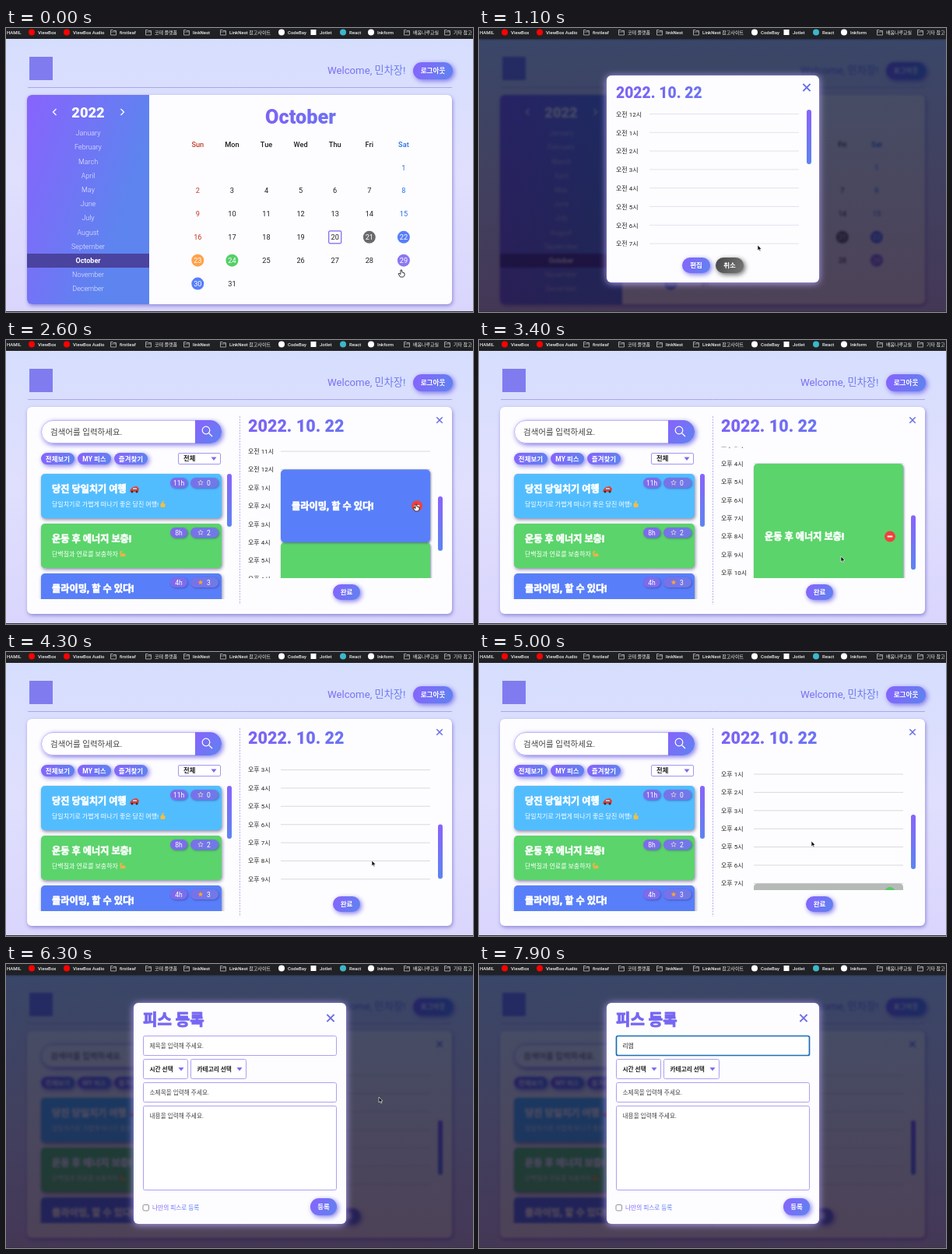
An HTML page with a canvas that plays this animation: 600 by 365 pixels, repeating every 8 s.

```html
<!DOCTYPE html>
<html lang="ko">
<head>
<meta charset="utf-8">
<title>Planner</title>
<style>
html, body { margin: 0; width: 100%; height: 100%; overflow: hidden; }
canvas { display: block; width: 600px; height: 365px; }
</style>
</head>
<body>
<canvas></canvas>
<script>
const LOOP = 8000, HOUR = 23.4;
const canvas = document.querySelector('canvas'), c = canvas.getContext('2d');
const dpr = devicePixelRatio || 1;
canvas.width = 600 * dpr;
canvas.height = 365 * dpr;

const FONT = "Roboto, 'Noto Sans CJK KR', 'Noto Sans CJK', sans-serif";
const BLUE = '#587ff9', GREEN = '#5bd46b', INK = '#222', PURPLE = '#7667f2';
const MONTHS = 'January February March April May June July August September October November December'.split(' ');
const DAYS = 'Sun Mon Tue Wed Thu Fri Sat'.split(' ');
const MARKED = { 21: '#6a6a6c', 22: BLUE, 23: '#ffa24a', 24: '#55cf68', 29: '#8b78f2', 30: BLUE };

const BOOKMARKS = [
  [33, 'dot', '#f00', 'ViewBox'], [78, 'dot', '#f00', 'ViewBox Audio'], [138, 'folder', '', 'firstleaf'],
  [183, 'folder', '', '코테 플랫폼'], [232, 'folder', '', 'linkNest'], [279, 'folder', '', 'LinkNest 참고사이트'],
  [354, 'dot', '#fff', 'CodeBay'], [395, 'square', '#fff', 'Jotlet'], [433, 'dot', '#3bb8c9', 'React'],
  [469, 'dot', '#fff', 'Inkform'], [515, 'folder', '', '배움나루교실'], [567, 'folder', '', '기타 참고']
];

// Keyframes: time, value(s)
const SCROLL = [[1850, 424], [2400, 166.5], [2800, 166.5], [3300, 65.4], [4050, 65.4], [4850, 133.6], [5150, 133.6], [5550, 166.5]];
const POINTER = [[0, 508, 311], [300, 508, 311], [500, 511, 268], [700, 510, 268], [1100, 358, 279], [1400, 279, 303],
  [1700, 279, 303], [2050, 440, 230], [2500, 527, 211], [2800, 527, 211], [3300, 465, 278], [3450, 465, 278],
  [3700, 528, 251], [3900, 528, 251], [4300, 470, 268], [5000, 427, 243], [5600, 527, 202], [5950, 527, 202],
  [6250, 479, 171], [6350, 479, 171], [6800, 300, 103]];
const TYPED = [[7400, 'ㄹ'], [7500, '리'], [7600, '링'], [7700, '리애'], [7800, '리앰']];

const ramp = (t, a, b) => Math.min(1, Math.max(0, (t - a) / (b - a)));
const between = (t, a, b) => t >= a && t < b;

function track(keys, t, column = 1) {
  let i = keys.findIndex(k => k[0] > t);
  if (i < 0) return keys[keys.length - 1][column];
  if (i === 0) return keys[0][column];
  const a = keys[i - 1], b = keys[i], u = ramp(t, a[0], b[0]);
  return a[column] + (b[column] - a[column]) * u * u * (3 - 2 * u);
}

function gradient(x, y, w, h, from = '#8863fd', to = '#5d84ef') {
  const g = c.createLinearGradient(x, y, x + w, y + h);
  g.addColorStop(0, from);
  g.addColorStop(1, to);
  return g;
}

function shadow(color, blur, dx = 0, dy = 0) {
  c.shadowColor = color;
  c.shadowBlur = blur * dpr;
  c.shadowOffsetX = dx * dpr;
  c.shadowOffsetY = dy * dpr;
}

function box(x, y, w, h, r, fill, stroke, lineWidth = 1) {
  c.beginPath();
  c.roundRect(x, y, w, h, r);
  if (fill) { c.fillStyle = fill; c.fill(); }
  if (stroke) { c.strokeStyle = stroke; c.lineWidth = lineWidth; c.stroke(); }
}

function shaded(x, y, w, h, r, fill, color = 'rgba(100,85,230,.8)', blur = 6, dx = 2, dy = 2) {
  c.save();
  shadow(color, blur, dx, dy);
  box(x, y, w, h, r, fill);
  c.restore();
}

function disc(x, y, r, fill) {
  c.beginPath();
  c.arc(x, y, r, 0, 7);
  c.fillStyle = fill;
  c.fill();
}

function line(points, color, width = 1) {
  c.beginPath();
  points.forEach(([x, y]) => c.lineTo(x, y));
  c.strokeStyle = color;
  c.lineWidth = width;
  c.stroke();
}

function poly(points, fill) {
  c.beginPath();
  points.forEach(([x, y]) => c.lineTo(x, y));
  c.closePath();
  c.fillStyle = fill;
  c.fill();
}

// Weight 900 gets an outline, since the Korean face stops at bold.
function text(s, x, y, size, fill = INK, weight = 400, align = 'left') {
  c.font = `${weight} ${size}px ${FONT}`;
  c.textAlign = align;
  c.fillStyle = fill;
  c.fillText(s, x, y + size * .36);
  if (weight === 900) {
    c.lineJoin = 'round';
    c.strokeStyle = fill;
    c.lineWidth = size * .05;
    c.strokeText(s, x, y + size * .36);
  }
}

const label = (s, x, y, size, fill, weight) => text(s, x, y, size, fill, weight, 'center');

function clipped(x, y, w, h, draw) {
  c.save();
  c.beginPath();
  c.rect(x, y, w, h);
  c.clip();
  draw();
  c.restore();
}

function pill(s, x, y, w, h, size = 8.5, fill = gradient(x, y, w, h)) {
  shaded(x, y, w, h, h / 2, fill);
  label(s, x + w / 2, y + h / 2, size, '#fff', 700);
}

function cross(x, y, r, width) {
  line([[x - r, y - r], [x + r, y + r]], '#6b6de6', width);
  line([[x - r, y + r], [x + r, y - r]], '#6b6de6', width);
}

const triangle = (x, y) => poly([[x - 3.5, y - 2], [x + 3.5, y - 2], [x, y + 2.5]], '#7a6cf0');
const scrollbar = (x, y, h) => box(x, y, 6, h, 3, gradient(x, y, 0, h));
const hourName = h => `${h > 12 ? '오후' : '오전'} ${h % 12 || 12}시`;

function bookmarks() {
  box(0, 0, 600, 14, 0, '#202124');
  text('HAMIL', 1, 5.5, 6, '#eee', 500);
  for (const [x, kind, color, name] of BOOKMARKS) {
    if (kind === 'dot') disc(x, 5.5, 4, color);
    else if (kind === 'square') box(x - 3.5, 2, 7, 7, 0, color);
    else {
      line([[x - 3.5, 9], [x - 3.5, 2.5], [x - 1, 2.5], [x, 3.5], [x + 3.5, 3.5], [x + 3.5, 9], [x - 3.5, 9]], '#bbb', .8);
      line([[x - 3.5, 5], [x + 3.5, 5]], '#bbb', .7);
    }
    text(name, x + 8, 5.5, 6, '#eee', 500);
  }
}

function header() {
  const bg = gradient(0, 14, 0, 351, '#d6defe', '#d9d5fd');
  bg.addColorStop(.5, '#e0dffd');
  box(0, 14, 600, 351, 0, bg);
  box(30, 37, 30, 30, 0, '#807cf0');
  text('Welcome, 민차장!', 413, 54.5, 13.2, gradient(413, 0, 100, 0, '#7d6cf0', '#6a80ee'));
  pill('로그아웃', 523, 44, 51, 22, 8.6);
  line([[28, 76.5], [573, 76.5]], '#aaa6ec');
}

const panel = h => shaded(27, 86, 546, h, 6, '#fdfdff', 'rgba(90,80,190,.6)', 5, 1, 2);

function calendar() {
  panel(269);
  box(27, 86, 157, 269, [6, 0, 0, 6], gradient(27, 86, 157, 50));
  label('2022', 105.5, 108, 18.3, '#fff', 800);
  line([[64.5, 104], [60.5, 108], [64.5, 112]], '#fff', 1.3);
  line([[147.5, 104], [151.5, 108], [147.5, 112]], '#fff', 1.3);
  box(27, 290, 157, 18, 0, '#4a439f');
  MONTHS.forEach((m, i) => label(m, 105.5, 135 + i * 18.18, 9, i === 9 ? '#fff' : '#efedff', i === 9 ? 700 : 300));

  label('October', 378.5, 114, 25.3, gradient(333, 0, 91, 0, '#7d62f6', '#6b73f2'), 800);
  const column = d => 246.3 + d * 44.1;
  const tint = d => d === 0 ? '#c23a25' : d === 6 ? '#2770e2' : INK;
  DAYS.forEach((d, i) => label(d, column(i), 149.5, 9.2, tint(i), 500));
  for (let day = 1; day <= 31; day++) {
    const cell = day + 5, d = cell % 7, x = column(d), y = 179.3 + Math.floor(cell / 7) * 29.85;
    if (MARKED[day]) disc(x, y, 8, MARKED[day]);
    if (day === 20) box(x - 8, y - 8, 16, 16, 1.5, null, PURPLE, 1.2);
    label(day, x, y, 9.2, MARKED[day] ? '#fff' : tint(d), 400);
  }
}

function star(x, y, filled) {
  const points = Array.from({ length: 11 }, (_, i) => {
    const a = i * Math.PI / 5 - Math.PI / 2, r = i % 2 ? 1.5 : 3.4;
    return [x + r * Math.cos(a), y + r * Math.sin(a)];
  });
  if (filled) poly(points, '#ffa62e');
  else line(points, '#e5ddd0', .7);
}

function car(x, y) {
  poly([[x - 6, y + 3], [x - 5, y], [x - 2, y - 3], [x + 3, y - 4], [x + 6, y - 1], [x + 5, y + 3]], '#e33c36');
  box(x - 2, y - 2, 5, 2, 0, '#9bd0e8');
  disc(x - 3, y + 3, 1.5, '#333');
  disc(x + 3, y + 3, 1.5, '#333');
}

function thumb(x, y) {
  box(x - 2.5, y - 1, 6, 5, 1.5, '#f6bd43');
  line([[x - 1, y + 1], [x + 1, y - 4]], '#f6bd43', 2);
}

function arm(x, y) {
  line([[x - 1, y - 3.5], [x - 3, y - 2], [x - 2, y + 2.5], [x + 3.5, y + 2]], '#f5b145', 2);
  disc(x + 1, y + 1, 2, '#f5b145');
}

function piece(y, fill, title, sub, hours, stars, filled) {
  shaded(45, y, 232, 57, 5, fill, 'rgba(60,60,110,.6)', 4, 1, 2);
  text(title, 59, y + 19.5, 12.2, '#fff', 900);
  text(sub, 59, y + 39, 8, '#fff');
  const tag = gradient(211, y, 62, 14, '#8068ec', '#6f7be6');
  shaded(211, y + 5, 22, 13, 6.5, tag, 'rgba(60,50,160,.6)', 3, 1, 1);
  shaded(237, y + 5, 36, 13, 6.5, tag, 'rgba(60,50,160,.6)', 3, 1, 1);
  label(hours, 222, y + 11.5, 8.5, '#fff');
  star(250, y + 11.5, filled);
  label(stars, 260.5, y + 11.5, 8.5, '#fff');
}

function pieceList() {
  shaded(45, 103, 232, 30, 15, '#fff');
  box(45.5, 103.5, 231, 29, 14.5, null, '#bdb6f5');
  box(243, 103, 34, 30, [0, 15, 15, 0], gradient(243, 103, 34, 30));
  c.beginPath();
  c.arc(257, 116, 4.8, 0, 7);
  c.strokeStyle = '#fff';
  c.lineWidth = 1.2;
  c.stroke();
  line([[260.5, 119.5], [265, 124]], '#fff', 1.3);
  text('검색어를 입력하세요.', 57, 118, 10.5, '#444');
  pill('전체보기', 45, 145, 43, 15);
  pill('MY 피스', 92, 145, 43, 15);
  pill('즐겨찾기', 139, 145, 43, 15);
  box(221.5, 145.5, 54, 14, 1.5, '#fff', '#a296f3');
  text('전체', 228, 152.5, 8.3, INK, 700);
  triangle(267, 152.5);
  clipped(40, 168, 242, 165, () => {
    piece(172, '#52bdfe', '당진 당일치기 여행', '당일치기로 가볍게 떠나기 좋은 당진 여행!', '11h', '0');
    car(165, 192);
    thumb(201, 211);
    piece(236, GREEN, '운동 후 에너지 보충!', '단백질과 연료를 보충하자', '8h', '2');
    arm(150, 275);
    piece(300, BLUE, '클라이밍, 할 수 있다!', '', '4h', '3', true);
  });
  scrollbar(284, 172, 68);
}

function booking(start, hours, noon, fill, title) {
  const y = noon + (start - 12) * HOUR, h = hours * HOUR, mid = y + h / 2;
  shaded(353, y, 192, h, 5, fill, 'rgba(50,60,110,.6)', 3, 1, 1);
  text(title, 367, mid, 12.2, '#fff', 900);
  disc(528, mid, 7, '#f2403c');
  box(524.5, mid - 1, 7, 2, 1, '#fff');
}

function schedule(t) {
  const noon = track(SCROLL, t);
  text('2022. 10. 22', 311, 110, 21.5, gradient(311, 0, 122, 0, '#7d62f6', '#6b73f2'), 800);
  cross(557, 103, 3.7, 1.5);
  clipped(305, 137.5, 248, 168.5, () => {
    for (let h = 0; h < 24; h++) {
      const y = noon + (h - 12) * HOUR;
      text(hourName(h), 311, y, 8);
      line([[353, y], [545, y]], '#d0d0d8', .8);
    }
    if (t < 3800) booking(16, 8, noon, GREEN, '운동 후 에너지 보충!');
    if (t < 2700) booking(12, 4, noon, BLUE, '클라이밍, 할 수 있다!');
    if (between(t, 4400, 5950)) {
      const y = noon + 7 * HOUR;
      box(353, y, 192, HOUR, 5, '#b6bab7');
      disc(528, y + HOUR / 2, 7, '#55cb67');
      label('+', 528, y + HOUR / 2, 11, '#fff', 700);
    }
  });
  scrollbar(555, 201 + (166.5 - noon) * .24, 70);
  pill('완료', 420, 314, 35, 20);
}

function editor(t) {
  panel(266);
  pieceList();
  c.setLineDash([2, 1.5]);
  line([[300.5, 98], [300.5, 340]], '#aaa5eb', .9);
  c.setLineDash([]);
  schedule(t);
}

function blurScene() {
  c.save();
  c.setTransform(1, 0, 0, 1, 0, 0);
  c.filter = `blur(${1.5 * dpr}px)`;
  c.drawImage(canvas, 0, 0);
  c.restore();
}

function dialog(alpha, y, h, draw) {
  if (!alpha) return;
  c.save();
  c.globalAlpha = alpha;
  blurScene();
  box(0, 14, 600, 351, 0, gradient(0, 14, 0, 351, 'rgba(0,14,48,.73)', 'rgba(16,0,28,.74)'));
  shaded(164, y, 273, h, 6, '#fdfdff', 'rgba(185,170,255,1)', 10, 0, 1);
  draw();
  c.restore();
}

function dayDialog() {
  text('2022. 10. 22', 176, 83, 19.3, gradient(176, 0, 109, 0, '#7d62f6', '#6b73f2'), 800);
  cross(421, 76.5, 4.6, 2);
  clipped(170, 102, 245, 178.5, () => {
    for (let h = 0; h < 8; h++) {
      const y = 111 + h * 23.8;
      text(hourName(h), 176, y, 8);
      line([[219, y - .5], [411, y - .5]], '#dedfec', .9);
    }
  });
  scrollbar(421, 105, 70);
  pill('편집', 261, 295, 36, 20);
  shaded(304, 295, 36, 20, 10, gradient(304, 295, 36, 20, '#484848', '#777'), 'rgba(60,60,60,.8)');
  label('취소', 322, 305, 8.5, '#fff', 700);
}

function field(x, y, w, h, hint, select) {
  box(x + .5, y + .5, w - 1, h - 1, 2, '#fff', '#aca1f2');
  text(hint, x + 8.5, y + 13, 7.7, select ? INK : '#444', select ? 700 : 400);
  if (select) triangle(x + w - 9, y + 13);
}

function pieceDialog(t) {
  text('피스 등록', 176, 72, 20, PURPLE, 900);
  cross(417, 69.5, 4.6, 2);
  const typed = TYPED.filter(k => t >= k[0]).pop();
  field(176, 92, 249, 26, typed ? '' : '제목을 입력해 주세요.');
  if (t >= 6900) box(176.5, 92.5, 248, 25, 2, null, '#1a6db5', 1.7);
  if (typed) text(typed[1], 184.5, 105, 7.7, INK);
  field(176, 122, 58, 26, '시간 선택', true);
  field(237, 122, 72, 26, '카테고리 선택', true);
  field(176, 152, 249, 26, '소제목을 입력해 주세요.');
  field(176, 182, 249, 109, '내용을 입력해 주세요.');
  box(176, 309.5, 7.5, 7.5, 1.5, '#fff', '#777', .8);
  text('나만의 피스로 등록', 188, 313.5, 7.7, gradient(188, 0, 60, 0, '#8863fd', '#5d84ef'), 500);
  pill('등록', 391, 301, 34, 22);
}

function pointer(t) {
  if (t >= 7300) return;
  c.save();
  c.translate(track(POINTER, t), track(POINTER, t, 2));
  c.lineJoin = 'round';
  const hand = t < 650 || between(t, 1350, 1650) || between(t, 2400, 2750) || between(t, 3650, 3850) || between(t, 5600, 5950);
  if (t >= 6700) {
    line([[0, -4], [0, 4]], '#333', .9);
  } else if (hand) {
    const shape = [[-1, 0], [.5, 0], [1, 3], [4, 4], [4, 7], [2.5, 9], [-1.5, 9], [-4, 5], [-3, 4.3], [-1, 5.5], [-1, 0]];
    poly(shape, '#fff');
    line(shape, '#222', .9);
  } else {
    const shape = [[0, 0], [0, 7], [1.6, 5.6], [2.8, 8], [3.9, 7.4], [2.8, 5.2], [5, 5], [0, 0]];
    poly(shape, '#111');
    line(shape, '#fff', .6);
  }
  c.restore();
}

function frame(now) {
  const t = now % LOOP;
  c.setTransform(dpr, 0, 0, dpr, 0, 0);
  header();
  if (t < 1600) calendar();
  else editor(t);
  if (t < 1600) dialog(ramp(t, 550, 750), 61, 266, dayDialog);
  else dialog(ramp(t, 5920, 6120), 50, 284, () => pieceDialog(t));
  bookmarks();
  box(0, 364, 600, 1, 0, '#33333a');
  pointer(t);
  requestAnimationFrame(frame);
}
requestAnimationFrame(frame);
</script>
</body>
</html>
```
